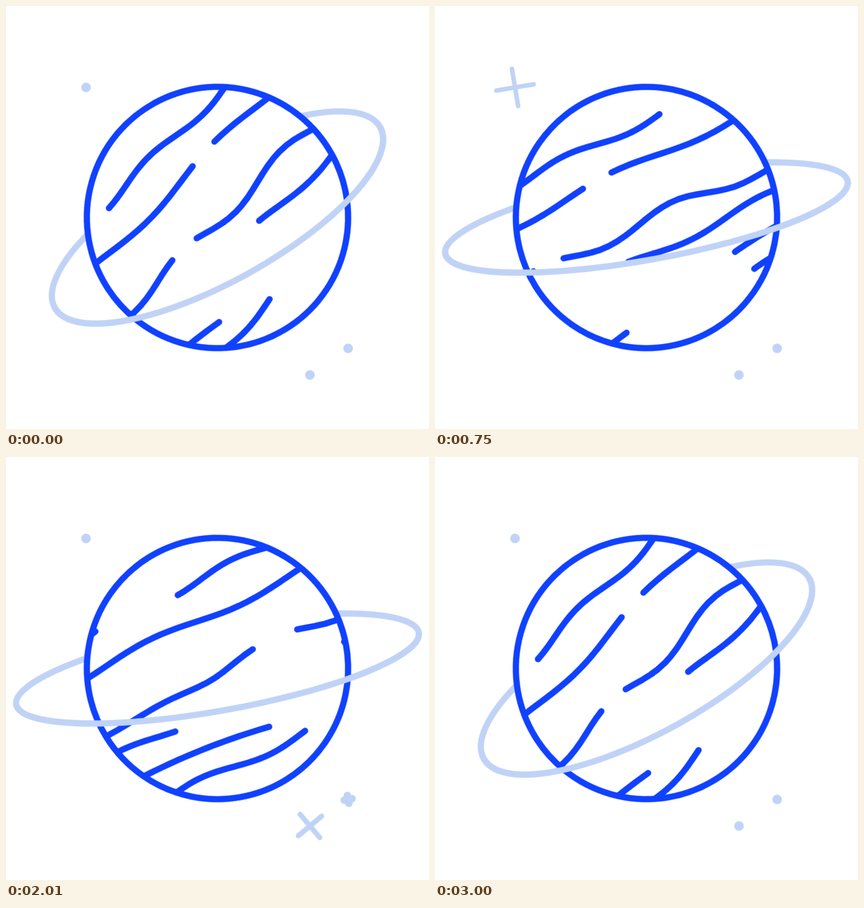
Animation of 748x748 px, one loop 3.03 s. Source, as an HTML page:

```html
<!DOCTYPE html>
<html lang="en">
<head>
<meta charset="utf-8">
<title>Planet</title>
<style>
  html, body { margin: 0; width: 100%; height: 100%; overflow: hidden; background: #fff; }
  svg { display: block; width: 100%; height: 100%; }

  path, ellipse, .rim { fill: none; stroke-width: 11; stroke-linecap: round; stroke-linejoin: round; }
  .rim, .stripes path { stroke: #1041ff; }
  .ring, .star { stroke: #c0d3f6; }

  .tilt { animation: tilt 3030ms infinite; }
  .ring { rx: 329px; ry: 113px; animation: widen 3030ms infinite; }
  .stripes path { d: var(--from); animation: flow 3030ms infinite; }
  .star {
    d: path("M -.01 0 L .01 0 M 0 -.01 L 0 .01");
    stroke-width: 17px;
    animation: 3030ms var(--at) infinite;
    animation-name: spin, grow, thin;
  }

  /* 1500 ms = 49.505%, 3000 ms = 99.01% */
  @keyframes tilt {
    0% { transform: rotate(-29deg); animation-timing-function: cubic-bezier(.225, 0, .183, 1); }
    49.505% { transform: rotate(-6deg); animation-timing-function: cubic-bezier(.58, 0, .44, 1); }
    99.01%, 100% { transform: rotate(-29deg); }
  }
  @keyframes widen {
    0% { rx: 329px; ry: 113px; animation-timing-function: cubic-bezier(.225, 0, .183, 1); }
    49.505% { rx: 368.7px; ry: 66.3px; animation-timing-function: cubic-bezier(.58, 0, .44, 1); }
    99.01%, 100% { rx: 329px; ry: 113px; }
  }
  @keyframes flow {
    0% { d: var(--from); animation-timing-function: cubic-bezier(.333, 0, .667, 1); }
    99.01%, 100% { d: var(--to); }
  }

  @keyframes spin {
    0% { transform: rotate(0deg); animation-timing-function: cubic-bezier(.333, 0, .667, 1); }
    41.25%, 100% { transform: rotate(180deg); }
  }
  @keyframes grow {
    0% {
      d: path("M -.01 0 L .01 0 M 0 -.01 L 0 .01");
      animation-timing-function: cubic-bezier(.333, 0, .667, 1);
    }
    20% {
      d: path("M -33.6 0 L 33.6 0 M 0 -33.6 L 0 33.6");
      animation-timing-function: cubic-bezier(.333, 0, .667, 1);
    }
    41.25%, 100% { d: path("M -.01 0 L .01 0 M 0 -.01 L 0 .01"); }
  }
  @keyframes thin {
    0% { stroke-width: 17px; animation-timing-function: cubic-bezier(.3, .35, .67, 1); }
    20% { stroke-width: 8px; animation-timing-function: cubic-bezier(.33, 0, .7, .65); }
    41.25%, 100% { stroke-width: 17px; }
  }
</style>
</head>
<body>
<svg viewBox="-374 -374 748 748">
  <defs>
    <clipPath id="disc"><circle r="232"/></clipPath>
    <clipPath id="front"><rect x="-400" y="0" width="800" height="200"/></clipPath>
  </defs>
  <g transform="translate(-232.5 -230)"><path class="star" style="--at: 170ms"/></g>
  <g transform="translate(231 231.5)"><path class="star" style="--at: 950ms"/></g>
  <g transform="translate(163.5 278.5)"><path class="star" style="--at: 1578ms"/></g>
  <g class="tilt">
    <ellipse class="ring"/>
    <circle r="231" fill="#fff"/>
    <g clip-path="url(#disc)"><g class="stripes" transform="rotate(-16)"></g></g>
    <circle class="rim" r="231"/>
    <g clip-path="url(#front)"><ellipse class="ring"/></g>
  </g>
</svg>
<script>
(() => {
  const STEPS = 40;
  const group = document.querySelector('.stripes');

  // Lane shapes: height as a function of the distance along the lane
  const wave = (mid, amp, crest, half) => x => mid + amp * Math.cos(Math.PI * (x - crest) / half);

  const swing = turns => x => {
    const i = turns.findIndex(turn => turn[0] > x);
    const [[x0, y0], [x1, y1]] = [turns[i - 1], turns[i]];
    return y0 + (y1 - y0) * (1 - Math.cos(Math.PI * (x - x0) / (x1 - x0))) / 2;
  };

  // The lane between two distances, moved and stretched along its direction
  function trace({ y, from, to }, shift, stretch = 1) {
    const points = Array.from({ length: STEPS + 1 }, (_, i) => {
      const x = from + (to - from) * i / STEPS;
      return `${(x * stretch + shift).toFixed(2)} ${y(x).toFixed(2)}`;
    });
    return `path("M ${points.join(' L ')}")`;
  }

  function addStripe(from, to) {
    const path = document.createElementNS('http://www.w3.org/2000/svg', 'path');
    path.style.setProperty('--from', from);
    path.style.setProperty('--to', to);
    group.append(path);
  }

  // Each run is a stripe's starting shift and how far it travels
  const lanes = [
    { y: wave(-154.5, 7.5, 113, 125), from: -124, to: 172, runs: [[0, 452], [464, 464]] },
    { y: wave(-90.7, 8, 268, 177), from: 91, to: 744, runs: [[-711, 711], [0, 711], [770, 770]] },
    {
      y: swing([[-95, -6], [28, 16], [162, -5], [293, 21], [428, 12.5], [495, 14.5], [620, -4]]),
      from: -52, to: 601, runs: [[-711, 711], [0, 711], [821, 821]]
    },
    { y: wave(62.4, 7.6, 165, 145), from: 48, to: 414, runs: [[0, 711], [683, 683]] },
    { y: wave(168.8, 8.2, 390, 132), from: 209.5, to: 464, runs: [[-501, 540], [0, 501]] }
  ];
  for (const lane of lanes) {
    for (const [start, dist] of lane.runs) addStripe(trace(lane, start), trace(lane, start - dist));
  }

  // The bowed lane stretches on its way in, then slides out
  const bow = { y: s => 113.6 + 57 * (s - .42) ** 2, from: 0, to: 1 };
  const rest = trace(bow, -535.7, 407);
  addStripe(trace(bow, 234.3, 287), rest);
  addStripe(rest, trace(bow, -1119.7, 407));
})();
</script>
</body>
</html>
```
